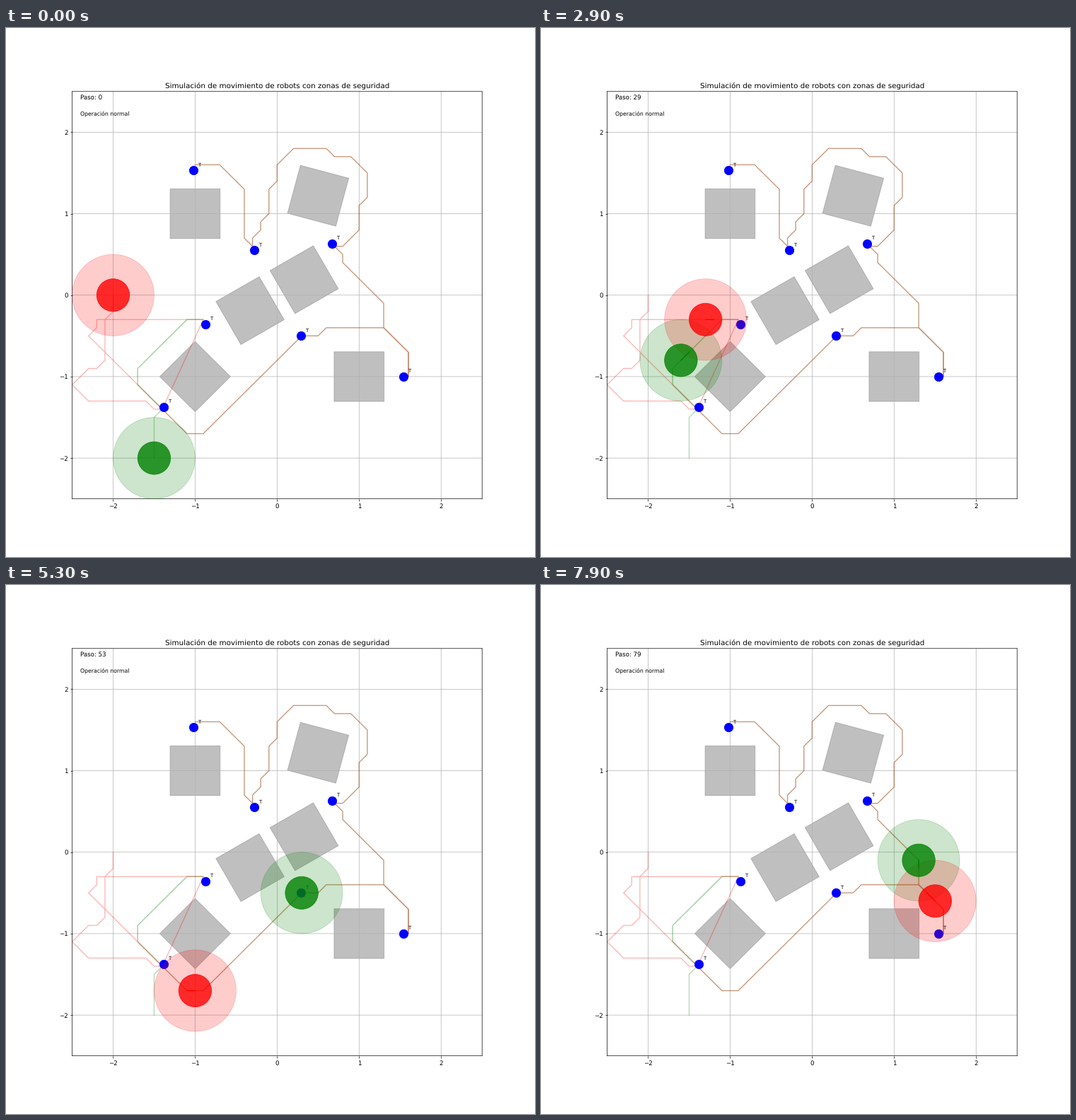
Write a matplotlib script that moves like this. It is 748 by 748 pixels and loops after 8000 ms.

```python
import numpy as np
import matplotlib.pyplot as plt
from matplotlib.animation import FuncAnimation
from matplotlib.patches import Circle, Polygon

STEPS = 80
CELL = 0.1
SIDE = 0.61

# Key cells of each leg; a robot pauses one step where a leg begins.
SHARED = [
    [(3, -5), (5, -5), (13, -4), (16, -10)],
    [(16, -10), (16, -7), (13, -1), (8, 5), (7, 6)],
    [(7, 6), (8, 6), (10, 11), (11, 15), (7, 17), (2, 18),
     (0, 14), (-1, 10), (-2, 8), (-3, 6)],
    [(-3, 6), (-4, 13), (-10, 16)],
]
GREEN = [
    [(-15, -20), (-15, -15), (-14, -14)],
    [(-14, -14), (-17, -9), (-9, -3)],
    [(-9, -3), (-11, -3), (-17, -11), (-9, -17), (3, -5)],
] + SHARED
# Red jumps straight from the first target to the second.
RED = [
    [(-20, 0), (-20, -2), (-21, -8), (-23, -9), (-25, -11), (-16, -13), (-14, -14)],
    [(-9, -3), (-22, -3), (-22, -4), (-23, -5), (-9, -17), (3, -5)],
] + SHARED

TARGETS = [(-1.02, 1.53), (-0.28, 0.55), (0.67, 0.63), (-0.87, -0.36),
           (0.29, -0.5), (1.54, -1), (-1.38, -1.37)]
OBSTACLES = [(-1, 1, 0), (1, -1, 0), (-1, -1, 45),
             (0.5, 1.22, -15), (0.33, 0.19, 30), (-0.33, -0.19, 30)]


def walk(leg):
    """Cells along a leg: diagonal steps first, then straight ones."""
    cells = [np.array(leg[0])]
    for goal in leg[1:]:
        while (cells[-1] != goal).any():
            cells.append(cells[-1] + np.sign(goal - cells[-1]))
    return cells


def route(legs):
    cells = [np.array(legs[0][0])]
    for leg in legs:
        cells += walk(leg)
    return np.array(cells) * CELL


def square(cx, cy, angle):
    a = np.radians(angle + 45 + 90 * np.arange(4))
    r = SIDE / np.sqrt(2)
    return np.column_stack([cx + r * np.cos(a), cy + r * np.sin(a)])


class Robot:
    def __init__(self, ax, legs, color):
        self.path = route(legs)
        ax.plot(*self.path.T, color=color, alpha=0.3)
        self.zone = ax.add_patch(
            Circle(self.path[0], 0.5, color=color, alpha=0.2, zorder=6))
        self.body = ax.add_patch(
            Circle(self.path[0], 0.2, color=color, alpha=0.8, zorder=7))
        self.trace, = ax.plot([], [], color=color, zorder=8)

    def move(self, step):
        self.zone.center = self.body.center = self.path[step]
        self.trace.set_data(*self.path[max(step - 1, 0):step + 1].T)
        return self.zone, self.body, self.trace


plt.rcParams.update({"font.family": "DejaVu Sans", "text.hinting": "none",
                     "path.snap": False})
fig, ax = plt.subplots(figsize=(12, 12), dpi=748 / 12)
ax.set_xlim(-2.5, 2.5)
ax.set_ylim(-2.5, 2.5)
ax.grid(True)
ax.set_title("Simulación de movimiento de robots con zonas de seguridad")

for obstacle in OBSTACLES:
    ax.add_patch(Polygon(square(*obstacle), color="gray", alpha=0.5))
ax.scatter(*zip(*TARGETS), s=200, color="blue", zorder=4)
for x, y in TARGETS:
    ax.text(x + 0.05, y + 0.05, "T", fontsize=8, zorder=5)

robots = [Robot(ax, GREEN, "green"), Robot(ax, RED, "red")]
counter = ax.text(0.02, 0.98, "", fontsize=10, transform=ax.transAxes)
ax.text(0.02, 0.94, "Operación normal", fontsize=9, transform=ax.transAxes)


def update(step):
    counter.set_text(f"Paso: {step}")
    artists = [counter]
    for robot in robots:
        artists += robot.move(step)
    return artists


anim = FuncAnimation(fig, update, frames=STEPS, interval=100,
                     repeat=True, repeat_delay=0, blit=False)
plt.show()
```
